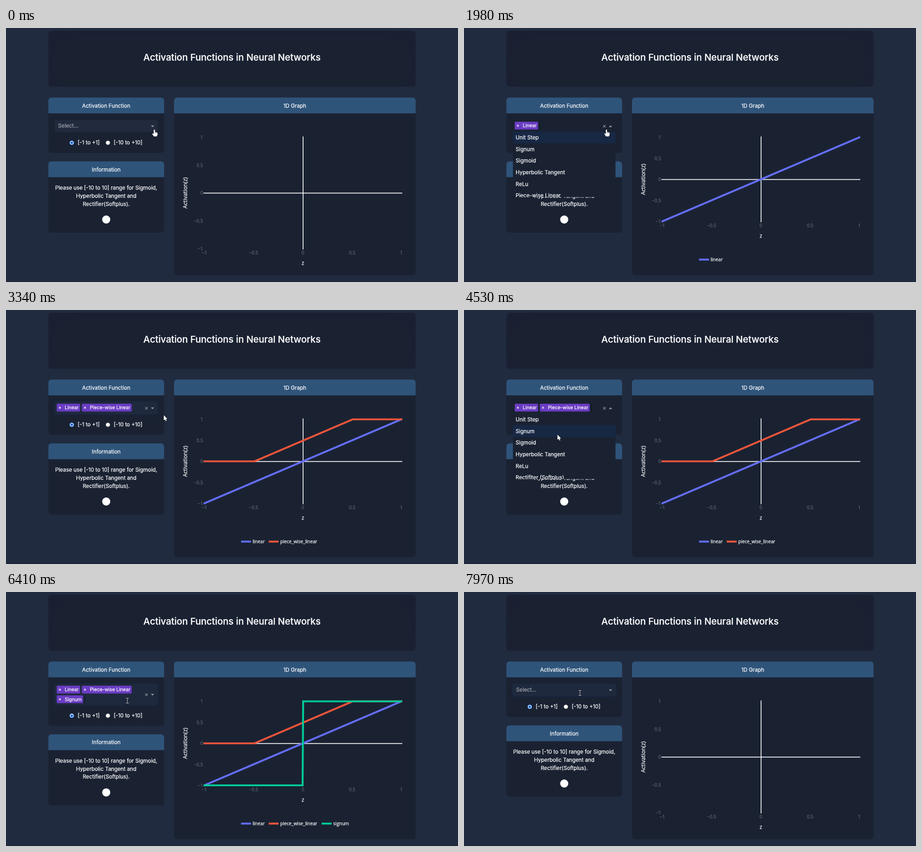
These frames come from a looping animation (998x561 px, 8 s). An HTML page with a canvas:

```html
<!DOCTYPE html>
<html lang="en">
<head>
<meta charset="utf-8">
<title>Activation Functions in Neural Networks</title>
<style>
html, body { margin: 0; width: 100%; height: 100%; overflow: hidden; background: #212b3f; }
canvas { display: block; }
</style>
</head>
<body>
<canvas id="stage" width="998" height="561"></canvas>
<script>
const ctx = document.getElementById('stage').getContext('2d');
const LOOP = 8000;
const UI = 'Inter, sans-serif', PLOT = '"Open Sans", sans-serif';
const BG = '#212b3f', PANEL = '#1a2232', HEAD = '#2f547a', WHITE = '#ffffff', DIM = '#616773', GREY = '#999ca3';
const BODY = 11.76;
const ROW = 25.6, MENU_TOP = 229, MENU_BOTTOM = 373.5;
const OPTIONS = ['Linear', 'Unit Step', 'Signum', 'Sigmoid', 'Hyperbolic Tangent', 'ReLu', 'Piece-wise Linear', 'Rectifiter (Softplus)'];
const SERIES = [
  { name: 'linear', color: '#636efa', legend: 519, pts: [[-1, -1], [1, 1]] },
  { name: 'piece_wise_linear', color: '#ef553b', legend: 580, pts: [[-1, 0], [-0.49, 0], [0.505, 1], [1, 1]] },
  { name: 'signum', color: '#00cc96', legend: 697, pts: [[-1, -1], [-0.003, -1], [0.003, 1], [1, 1]] }
];
const TAGS = [
  { name: 'Linear', x: 112, y: 207, w: 51.5 },
  { name: 'Piece-wise Linear', x: 167.5, y: 207, w: 110 },
  { name: 'Signum', x: 112, y: 228.3, w: 58 }
];
const CARETS = [115, 167, 281, 174];

const MENU_OPEN = [[390, 920], [1820, 2900], [4030, 4890]];
const CARET_ON = [[920, 1520], [1820, 2350], [4030, 5440], [6110, 6690]];
const PICKS = [920, 2900, 4890], CLEAR = 7380, LAG = 90;
// time, x, y of the pointer
const PATH = [
  [0, 327, 224], [390, 327, 224], [730, 243, 239], [980, 243, 239], [1330, 323, 223],
  [1820, 323, 223], [1980, 314, 224], [2610, 164, 358], [3000, 164, 358], [3340, 348, 232],
  [3610, 324, 222], [4130, 324, 222], [4530, 206, 275], [4670, 206, 274], [6110, 206, 274],
  [6410, 268, 240], [6690, 309, 222], [7480, 309, 222], [7970, 256, 223], [8000, 256, 223]
];

const within = (t, spans) => spans.some(([a, b]) => t >= a && t < b);
const picked = (t, lag) => t >= CLEAR + lag ? 0 : PICKS.filter(p => t >= p + lag).length;

function pointerAt(t) {
  let i = 1;
  while (i < PATH.length - 1 && t > PATH[i][0]) i++;
  const [t0, x0, y0] = PATH[i - 1], [t1, x1, y1] = PATH[i];
  const u = Math.min(1, (t - t0) / (t1 - t0)), e = u * u * (3 - 2 * u);
  return { x: x0 + (x1 - x0) * e, y: y0 + (y1 - y0) * e };
}

function box(x, y, w, h, color, r = 0) {
  ctx.fillStyle = color;
  ctx.beginPath();
  ctx.roundRect(x, y, w, h, r);
  ctx.fill();
}

// y is the middle of the capital letters; the hairline firms up small type
function text(s, x, y, size = BODY, color = WHITE, align = 'left', font = UI, weight = 400) {
  ctx.font = `${weight} ${size}px ${font}`;
  ctx.fillStyle = ctx.strokeStyle = color;
  ctx.textAlign = align;
  ctx.lineWidth = 0.25;
  ctx.lineJoin = 'round';
  ctx.fillText(s, x, y + size * 0.36);
  ctx.strokeText(s, x, y + size * 0.36);
}

function disc(x, y, r, color) {
  ctx.fillStyle = color;
  ctx.beginPath();
  ctx.arc(x, y, r, 0, 7);
  ctx.fill();
}

function line(pts, color, width) {
  ctx.strokeStyle = color;
  ctx.lineWidth = width;
  ctx.lineJoin = 'miter';
  ctx.beginPath();
  pts.forEach(([x, y]) => ctx.lineTo(x, y));
  ctx.stroke();
}

function cross(x, y, r, color, width) {
  line([[x - r, y - r], [x + r, y + r]], color, width);
  line([[x - r, y + r], [x + r, y - r]], color, width);
}

function card(x, y, w, h, title) {
  box(x, y, w, h, PANEL, 7);
  box(x, y, w, 35, HEAD, [7, 7, 0, 0]);
  text(title, x + w / 2, y + 17.9, BODY, WHITE, 'center');
}

function banner() {
  box(93.5, 6, 811, 123.5, '#1b2133', 7);
  ctx.save();
  ctx.beginPath();
  ctx.roundRect(93.5, 6, 811, 123.5, 7);
  ctx.clip();
  ctx.shadowColor = PANEL;
  ctx.shadowBlur = 24;
  box(112, 26, 774, 104, PANEL, 24);
  ctx.restore();
  text('Activation Functions in Neural Networks', 499, 65, 20.43, WHITE, 'center', UI, 500);
}

function radio(x, y, on) {
  disc(x, y, 5, on ? '#0b5fd0' : '#767676');
  disc(x, y, 4.1, WHITE);
  if (on) disc(x, y, 2.8, '#0b5fd0');
}

function control(count, open, focused, caret, drop) {
  if (!open) {
    ctx.save();
    if (focused) {
      ctx.shadowColor = '#1b2f50';
      ctx.shadowBlur = 5;
    }
    box(108, 203.5, 226.5, 26 + drop, focused ? '#1f293d' : '#222b3e', 2);
    ctx.restore();
  }
  if (!count) text('Select...', 115, 216, BODY, '#a0a3a9');
  TAGS.slice(0, count).forEach(g => {
    box(g.x, g.y, g.w, 17.2, '#6a3cc3', 2);
    cross(g.x + 6.9, g.y + 8.7, 2.1, WHITE, 1.1);
    text(g.name, g.x + 17.7, g.y + 8.7, 10.55);
  });
  if (caret) box(CARETS[count], count > 2 ? 230 : 209, 1, 15, '#080d18');
  const my = 217 + drop / 2;
  if (count) cross(310, my, 2.8, GREY, 1.1);
  const d = open ? -1 : 1;
  ctx.fillStyle = GREY;
  ctx.beginPath();
  ctx.moveTo(319.8, my - 1.8 * d);
  ctx.lineTo(327.2, my - 1.8 * d);
  ctx.lineTo(323.5, my + 2 * d);
  ctx.fill();
}

function menu(count, p) {
  const names = OPTIONS.filter(o => !TAGS.slice(0, count).some(g => g.name === o));
  const hover = p.y > MENU_TOP && p.x < 335 ? Math.floor((p.y - MENU_TOP) / ROW) : 0;
  ctx.save();
  ctx.beginPath();
  ctx.rect(108, MENU_TOP, 226.5, MENU_BOTTOM - MENU_TOP);
  ctx.clip();
  box(108, MENU_TOP, 227, 145, PANEL);
  box(108, MENU_TOP + hover * ROW, 227, ROW, '#172845');
  names.slice(0, 6).forEach((s, i) => text(s, 114, 242 + i * ROW));
  ctx.restore();
}

function sidebar(t, p) {
  const count = picked(t, 0), open = within(t, MENU_OPEN), drop = count > 2 ? 19.7 : 0;
  card(93.5, 153.5, 255.5, 122.5 + drop, 'Activation Function');
  control(count, open, t >= 20, within(t, CARET_ON), drop);
  radio(145.2, 253.5 + drop, true);
  radio(225, 253.5 + drop, false);
  text('[-1 to +1]', 158.2, 253 + drop);
  text('[-10 to +10]', 237.7, 253 + drop);
  card(93.5, 294.5 + drop, 255.5, 157.5, 'Information');
  ['Please use [-10 to 10] range for Sigmoid,', 'Hyperbolic Tangent and', 'Rectifier(Softplus).']
    .forEach((s, i) => text(s, 221.3, 353.2 + drop + i * 17.55, BODY, WHITE, 'center'));
  disc(221.3, 423 + drop, 9, WHITE);
  if (open) menu(count, p);
}

function graph(count) {
  const bottom = count ? 427 : 487, top = 241.5;
  const px = v => 655.5 + v * 217.5, py = v => (top + bottom) / 2 - v * (bottom - top) / 2;
  card(371, 153.5, 533.5, 392.5, '1D Graph');
  [-1, -0.5, 0, 0.5, 1].forEach(v => {
    const s = String(v).replace('-', '\u2212');
    text(s, 435, py(v) + 0.3, 10.1, DIM, 'right', PLOT);
    text(s, px(v), bottom + 9, 10.1, DIM, 'center', PLOT);
  });
  text('z', 655.5, bottom + 31.2, 12, WHITE, 'center', PLOT);
  ctx.save();
  ctx.translate(396, py(0));
  ctx.rotate(-Math.PI / 2);
  text('Activation(z)', 0, 0, 12.2, WHITE, 'center', PLOT);
  ctx.restore();
  line([[436, py(0) + 0.3], [875, py(0) + 0.3]], WHITE, 1.7);
  line([[655.9, top - 2], [655.9, bottom + 2]], WHITE, 1.7);

  const shown = SERIES.slice(0, count);
  ctx.save();
  ctx.beginPath();
  ctx.rect(436, top - 3, 439, bottom - top + 6);
  ctx.clip();
  ctx.lineCap = 'square';
  shown.forEach(s => line(s.pts.map(([x, y]) => [px(x), py(y)]), s.color, 4.2));
  ctx.restore();
  shown.forEach(s => {
    line([[s.legend, 511.5], [s.legend + 22, 511.5]], s.color, 4.2);
    text(s.name, s.legend + 25.5, 511.7, 10.15, WHITE, 'left', PLOT);
  });
}

const SHAPES = {
  arrow: new Path2D('M.4 .2V11.8L3 9.4L4.9 13.4L6.8 12.6L5 8.7H8.4Z'),
  hand: new Path2D('M-.9 1.2Q.5 -.7 1.9 1.2V6L3 5.5L4.2 6.3L5.5 6L6.3 7L7.6 7.2V11.5L6.1 15.5H-.6L-4 10.4Q-4.6 8.6 -3 8.6L-.9 10.4Z'),
  beam: new Path2D('M-3 -5.5H-.7L0 -5L.7 -5.5H3M0 -5V5M-3 5.5H-.7L0 5L.7 5.5H3')
};

function pointer(t, p) {
  const open = within(t, MENU_OPEN);
  const low = picked(t, 0) > 2 ? 250 : 230;
  const inside = p.x > 108 && p.x < 335 && p.y > 203 && p.y < low;
  const kind = !inside ? 'arrow' : p.x > 303 ? 'hand' : open ? 'arrow' : 'beam';
  ctx.save();
  ctx.translate(p.x, p.y);
  ctx.lineJoin = 'round';
  if (kind === 'beam') {
    ctx.strokeStyle = '#0c111b';
    ctx.lineWidth = 2.4;
    ctx.stroke(SHAPES.beam);
    ctx.strokeStyle = '#e3e5e8';
    ctx.lineWidth = 1;
    ctx.stroke(SHAPES.beam);
  } else {
    ctx.strokeStyle = '#0a0f19';
    ctx.lineWidth = 1.5;
    ctx.stroke(SHAPES[kind]);
    ctx.fillStyle = WHITE;
    ctx.fill(SHAPES[kind]);
    if (kind === 'hand') [1.9, 4.1, 6.1].forEach(x => line([[x, 6.4], [x, 8.8]], '#30343c', 0.6));
  }
  ctx.restore();
}

function draw(t) {
  const p = pointerAt(t);
  box(0, 0, 998, 561, BG);
  box(0, 560, 998, 1, '#182030');
  banner();
  sidebar(t, p);
  graph(picked(t, LAG));
  pointer(t, p);
}

const start = performance.now();
function tick() {
  draw((performance.now() - start) % LOOP);
  requestAnimationFrame(tick);
}
tick();
</script>
</body>
</html>
```
